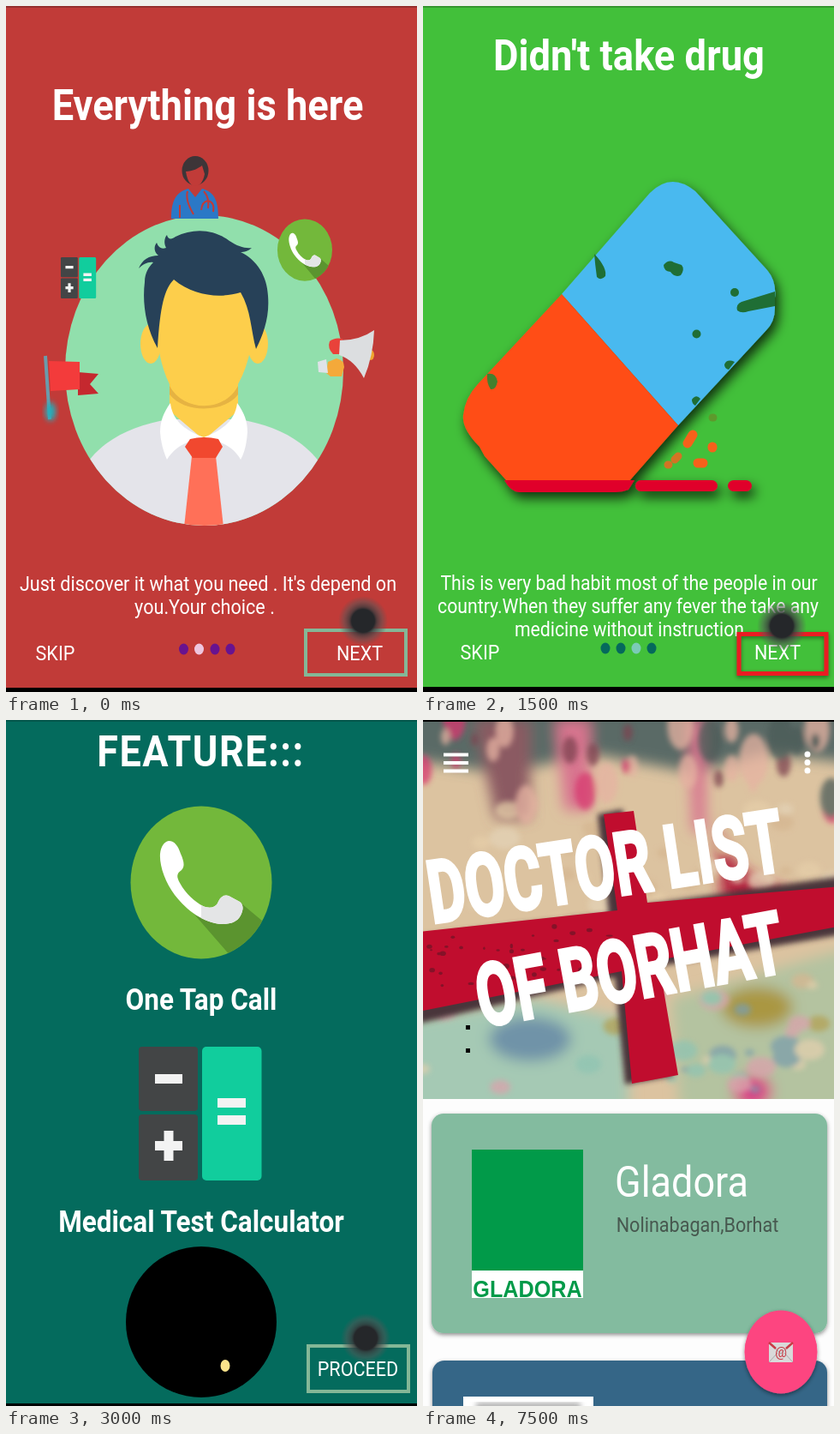
Animation of 480 by 800 pixels, one loop 9500 ms. Source, as an HTML page:

```html
<!DOCTYPE html>
<html lang="en">
<head>
<meta charset="utf-8">
<title>App walkthrough</title>
<style>
  html, body { margin: 0; width: 100%; height: 100%; overflow: hidden; background: #000; }
  svg { display: block; width: 100%; height: 100%; }
  .scene { display: none; }
  .scene.on { display: inline; }
  text { font: 24px Roboto, sans-serif; fill: #fff; text-anchor: middle;
         transform: scale(.9, 1); transform-box: fill-box; transform-origin: center; }
  .title { font-size: 50.3px; font-weight: 700; }
  .label { font-size: 35px; font-weight: 700; }
  .note text { font-size: 23.6px; }
  .banner text { font-size: 101px; font-weight: 700; text-anchor: start;
                 stroke: #fff; stroke-width: 4; stroke-linejoin: miter;
                 transform: scale(.665, 1); transform-box: view-box; transform-origin: 0 0; }
  .hand text { font: italic 700 22px "DejaVu Sans", sans-serif; letter-spacing: 1px;
               fill: #d8d8d8; stroke: #000; stroke-width: 2.4; transform: none; }
</style>
</head>
<body>
<svg viewBox="0 0 480 800" preserveAspectRatio="none">
  <defs>
    <radialGradient id="touch">
      <stop offset=".46" stop-color="#25272a"/>
      <stop offset=".56" stop-color="#3a3b3d" stop-opacity=".8"/>
      <stop offset=".78" stop-color="#555" stop-opacity=".5"/>
      <stop offset="1" stop-color="#555" stop-opacity="0"/>
    </radialGradient>
    <linearGradient id="skin" x1=".1" y1=".1" x2=".8" y2=".75">
      <stop offset=".15" stop-color="#fff"/>
      <stop offset=".5" stop-color="#a0a0a0"/>
      <stop offset=".75" stop-color="#eee"/>
      <stop offset="1" stop-color="#bbb"/>
    </linearGradient>
    <filter id="soft" x="-30%" y="-30%" width="160%" height="160%"><feGaussianBlur stdDeviation="3"/></filter>
    <filter id="haze" x="-30%" y="-30%" width="160%" height="160%"><feGaussianBlur stdDeviation="8"/></filter>
    <filter id="deep" x="-20%" y="-20%" width="140%" height="140%">
      <feDropShadow dx="4" dy="7" stdDeviation="7" flood-opacity=".75"/>
    </filter>
    <filter id="lift" x="-20%" y="-20%" width="140%" height="140%">
      <feDropShadow dx="0" dy="2" stdDeviation="2.5" flood-opacity=".45"/>
    </filter>
    <clipPath id="disc"><ellipse cx="231.500" cy="425" rx="162.500" ry="181"/></clipPath>
    <clipPath id="photo"><rect y="2" width="480" height="440"/></clipPath>
    <clipPath id="dial"><ellipse cx="228" cy="189.500" rx="82.500" ry="89"/></clipPath>
    <clipPath id="rightHalf"><rect x="228" y="190" width="60" height="60"/></clipPath>

    <path id="receiver" d="M190 141C197 141 201 147 204 156C208 165 209 171 205 175C199 179 199 183 203 190C210 203 221 212 230 217C237 220 244 219 247 214C250 206 255 203 260 205L273 212C278 216 277 222 274 228C270 236 261 238 252 238C231 237 211 222 197 204C186 189 179 170 180 156C181 147 185 142 190 141Z"/>
    <g id="phone">
      <ellipse cx="228" cy="189.500" rx="82.500" ry="89" fill="#73b83b"/>
      <path d="M209 214L275 290L330 260L275 214L240 232Z" fill="#5b942f" clip-path="url(#dial)"/>
      <use href="#receiver" fill="#fff"/>
      <use href="#receiver" fill="#e4e5e6" clip-path="url(#rightHalf)"/>
    </g>
    <g id="calc" fill="#434546">
      <rect x="155" y="381" width="69" height="75" rx="4"/>
      <rect x="155" y="460" width="69" height="77" rx="4"/>
      <rect x="229" y="381" width="69.500" height="156" rx="5" fill="#11cd9d"/>
      <path d="M174 413h32v11h-32zM174 491h32v11h-32zM184.500 479h11v35h-11zM247 441h33v11h-33zM247 461h33v11h-33z" fill="#f3f3f3"/>
    </g>
    <circle id="dot" r="29" fill="url(#touch)"/>
    <path id="handShape" d="M334 686C330 664 319 640 319 611C319 586 331 574 350 573L381 571C397 572 405 580 411 592C419 607 441 624 455 643C461 655 447 661 438 652L426 643C428 669 435 695 439 719C441 738 421 745 409 735C402 728 402 715 398 704C395 713 378 709 375 698C371 706 355 702 353 691C350 699 337 697 334 686Z"/>
  </defs>

  <!-- welcome -->
  <g class="scene" color="#c13b38">
    <rect width="480" height="800" fill="currentColor"/>
    <rect width="480" height="2" fill="#96302e"/>
    <rect y="795" width="480" height="5"/>
    <text class="title" x="235.500" y="133">Everything is here</text>

    <g clip-path="url(#disc)">
      <rect x="60" y="240" width="350" height="370" fill="#91dfac"/>
      <path d="M90 540C110 507 145 490 190 482H272C318 490 350 507 372 540V610H90Z" fill="#e4e4ea"/>
      <path d="M191 440H271V472L231 506L191 472Z" fill="#fdce4b"/>
      <path d="M191 443C208 474 255 474 271 443V453C255 475 208 475 191 453Z" fill="#e6b342"/>
      <path d="M192 463C184 474 180 484 180 497C181 510 184 520 188 529C196 516 208 508 231 503C206 494 194 481 192 463ZM270 463C278 474 282 484 282 497C281 510 279 520 274 529C267 516 254 508 231 503C256 494 268 481 270 463Z" fill="#fff"/>
      <path d="M217 525H245L254 608H208Z" fill="#ff7058"/>
      <path d="M215 505Q231 501 248 505L253 514L245 527H218L209 514Z" fill="#f1482f"/>
    </g>
    <g fill="#fdce4b">
      <ellipse cx="169" cy="394" rx="12" ry="23"/>
      <ellipse cx="294" cy="394" rx="12" ry="23"/>
      <path d="M178 335L198 310H270L290 340C291 379 286 414 271 441C253 469 209 469 191 441C177 413 173 375 178 335Z"/>
    </g>
    <path d="M177 399C163 374 159 346 162 322C162 311 167 304 172 299C166 298 160 301 155 306C159 296 167 291 178 291C172 286 173 280 176 276C178 282 182 284 187 282C184 277 185 270 188 267C189 272 193 273 198 269C219 259 242 260 261 274C270 280 279 283 287 282C283 286 278 287 274 287C293 296 305 315 306 338C308 362 301 382 292 400C286 378 286 354 274 334C251 341 220 339 196 319C185 330 180 350 177 399Z" fill="#274158"/>

    <ellipse cx="221" cy="192" rx="15.500" ry="17" fill="#3d3538"/>
    <path d="M210 193C218 193 225 189 229 186L232 196C230 207 225 210 221 210C216 210 212 205 210 193Z" fill="currentColor"/>
    <path d="M193 248C193 226 199 217 213 213L221 223L229 213C243 217 248 226 248 248Z" fill="#2b78c6"/>
    <path d="M212 216Q209 226 219 243M231 216Q238 224 236 236M228 238Q229 228 236 227Q244 229 242 240M203 232V247" fill="none" stroke="currentColor" stroke-width="2"/>

    <use href="#phone" transform="translate(260.500 207.600) scale(.388 .406)"/>
    <use href="#calc" transform="translate(19.500 175.700) scale(.287 .308)"/>

    <path d="M84 427L108 429L98 441L108 452L84 454Z" fill="#c5282f"/>
    <path d="M50 414L86 415V447L52 449Z" fill="#f33b3b"/>
    <path d="M46 408L51 482" stroke="#6a9bab" stroke-width="4"/>
    <ellipse cx="52" cy="473" rx="6" ry="11" fill="#20aebb" filter="url(#soft)"/>

    <path d="M378 391Q384 386 393 388V406H382Q375 399 378 391Z" fill="#e9423a"/>
    <ellipse cx="426" cy="407" rx="4" ry="6" fill="#f0a52f"/>
    <path d="M390 390Q413 390 430 378Q429 408 418 434Q407 413 389 407Z" fill="#dcdee0"/>
    <path d="M376 415L386 411Q395 413 395 421L392 432H379L374 428Z" fill="#f4a93a"/>
    <path d="M364 415L374 412L376 428L365 427Z" fill="#dfe3e8"/>

    <text x="236" y="682">Just discover it what you need . It's depend on</text>
    <text x="232" y="709">you.Your choice .</text>
    <g fill="#68138f">
      <ellipse cx="207.500" cy="750" rx="5.500" ry="6.500"/>
      <ellipse cx="225.500" cy="750" rx="5.500" ry="6.500" fill="#eec6df"/>
      <ellipse cx="244" cy="750" rx="5.500" ry="6.500"/>
      <ellipse cx="262" cy="750" rx="5.500" ry="6.500"/>
    </g>
    <text x="57.500" y="763">SKIP</text>
    <text x="413" y="763">NEXT</text>
    <rect x="350" y="728" width="117" height="52" fill="none" stroke="#84b797" stroke-width="4"/>
    <use class="dot" href="#dot" x="417" y="717"/>
  </g>

  <!-- warning -->
  <g class="scene" color="#42c03a">
    <rect width="480" height="800" fill="currentColor"/>
    <rect width="480" height="2" fill="#36962f"/>
    <rect y="794" width="480" height="6"/>
    <text class="title" x="240.500" y="75">Didn't take drug</text>

    <g filter="url(#deep)">
      <path d="M162 336L265 218Q290 193 318 216L402 308Q413 321 411 340V352Q411 368 401 378L298 489Z" fill="#49b9ef"/>
      <path d="M162 336L298 489L240 555H99L72 525L66 514Q45 493 47 477Q49 457 64 441Z" fill="#ff4e14"/>
      <path d="M95 553H247L240 564Q233 567 225 567H112Q102 566 95 553Z" fill="#e0062b"/>
      <rect x="248" y="553" width="96" height="13" rx="6.500" fill="#e0062b"/>
      <rect x="356" y="553" width="28" height="13" rx="6.500" fill="#e0062b"/>
    </g>
    <g fill="#1f6e35">
      <path d="M200 289Q215 305 213 315Q208 321 203 316Q201 302 200 289Z"/>
      <path d="M281 302Q287 295 293 299L302 302Q306 307 301 314Q294 317 289 310Q281 309 281 302Z"/>
      <path d="M411 333L372 345Q365 348 367 355Q372 359 380 356L411 350Z"/>
      <circle cx="364" cy="334" r="5"/>
      <circle cx="319.500" cy="382.500" r="5"/>
      <path d="M352 418Q355 411 364 415L357 424Q352 423 352 418Z"/>
      <path d="M314 459Q319 452 324 458L318 466Q314 464 314 459Z"/>
      <path d="M75 429Q85 427 87 438Q85 448 79 447Q74 440 75 429Z" fill="#43802e"/>
    </g>
    <g stroke="#f6611b" stroke-width="11" stroke-linecap="round">
      <path d="M315 500L309 510M338 514v1M321 533H327"/>
      <path d="M286 535h1M294 529L298 525" stroke="#d27424" stroke-width="9"/>
      <path d="M338 480h1" stroke="#5d9a2c" stroke-width="9"/>
    </g>

    <g class="note">
      <text x="240.500" y="681">This is very bad habit most of the people in our</text>
      <text x="239.500" y="708">country.When they suffer any fever the take any</text>
      <text x="241" y="735">medicine without instruction</text>
    </g>
    <g fill="#05695c">
      <ellipse cx="213" cy="749" rx="5.500" ry="6.500"/>
      <ellipse cx="231" cy="749" rx="5.500" ry="6.500"/>
      <ellipse cx="249" cy="749" rx="5.500" ry="6.500" fill="#7bcbb6"/>
      <ellipse cx="267" cy="749" rx="5.500" ry="6.500"/>
    </g>
    <text x="66.500" y="762">SKIP</text>
    <text x="414" y="762">NEXT</text>
    <rect x="369" y="732.500" width="102" height="46" fill="none" stroke="#ea1c23" stroke-width="5" filter="url(#lift)"/>
    <use class="dot" href="#dot" x="419" y="723"/>
  </g>

  <!-- features -->
  <g class="scene" color="#046b5d">
    <rect width="480" height="800" fill="currentColor"/>
    <rect width="480" height="2" fill="#04564b"/>
    <rect y="797" width="480" height="3"/>
    <text class="title" x="227.500" y="54" style="font-size:50px;letter-spacing:1.7px">FEATURE:::</text>
    <use href="#phone"/>
    <text class="label" x="228" y="338">One Tap Call</text>
    <use href="#calc"/>
    <text class="label" x="228" y="597">Medical Test Calculator</text>
    <circle cx="228" cy="702" r="88"/>
    <ellipse cx="256" cy="753" rx="5.500" ry="7" fill="#fbe38b"/>
    <text x="411" y="765">PROCEED</text>
    <rect x="353" y="730" width="117" height="53" fill="none" stroke="#84b797" stroke-width="4"/>
    <use class="dot" href="#dot" x="420" y="721"/>
  </g>

  <!-- doctor list -->
  <g class="scene">
    <rect width="480" height="800" fill="#fdfdfd"/>
    <rect width="480" height="2"/>
    <g clip-path="url(#photo)">
      <rect width="480" height="442" fill="#dcc3a0"/>
      <g filter="url(#haze)">
        <path d="M-20-20H500V50L400 38L320 62L200 40L90 62L-20 45Z" fill="#5a6a66"/>
        <path d="M60 0H125V115H85Z" fill="#8b5a62"/>
        <path d="M155 0H195V105H165ZM310 0H330V130H315Z" fill="#d8748f"/>
        <path d="M-20 350L130 325L240 350V460H-20Z" fill="#a5c9b4"/>
        <path d="M290 325L500 265V460H300Z" fill="#b4c3a0"/>
        <ellipse cx="125" cy="372" rx="48" ry="26" fill="#6f93a8"/>
        <ellipse cx="390" cy="335" rx="42" ry="24" fill="#aa9743"/>
        <ellipse cx="385" cy="433" rx="22" ry="20" fill="#d93f86"/>
        <path d="M340 110Q350 180 430 200L470 215L450 235L350 215Z" fill="#b3213c"/>
      </g>
      <g id="paint" filter="url(#soft)" opacity=".75"></g>
      <path d="M204 110L233 104L256 216L490 182V250L270 288L292 415L236 425L224 300L-5 354V252L217 226Z" fill="#48343a" filter="url(#soft)"/>
      <path d="M211 110L246 106L262 213L490 194V240L275 280L298 414L244 424L232 293L-5 340V247L227 222Z" fill="#c00d2e"/>
      <g id="flecks" fill="#6d1526" opacity=".7"></g>
    </g>
    <g class="banner">
      <g transform="translate(11 237) rotate(-8.500)"><text>DOCTOR LIST</text></g>
      <g transform="translate(69 358) rotate(-10.300)"><text>OF BORHAT</text></g>
    </g>
    <path d="M50 356h5v5h-5zM50 383h5v5h-5z"/>
    <path d="M24 40.500H53M24 50H53M24 59.500H53" stroke="#fff" stroke-width="4"/>
    <path d="M449 40v0M449 49.500v0M449 59v0" stroke="#fff" stroke-width="7" stroke-linecap="round"/>

    <rect x="10" y="459" width="462" height="256" rx="14" fill="#83bb9f" filter="url(#lift)"/>
    <rect x="57" y="501" width="130" height="173" fill="#fff"/>
    <rect x="57" y="501" width="130" height="141" fill="#019a49"/>
    <text x="122" y="673" style="font:700 28px 'Liberation Sans',sans-serif;fill:#019a49">GLADORA</text>
    <text x="302" y="556" style="font-size:50px">Gladora</text>
    <text x="320.500" y="597" style="fill:#47584f">Nolinabagan,Borhat</text>

    <rect x="11" y="747" width="461" height="80" rx="14" fill="#356687" filter="url(#lift)"/>
    <rect x="47" y="789" width="152" height="11" fill="#fff"/>
    <rect x="62" y="797" width="122" height="6" fill="#999" filter="url(#soft)"/>
    <ellipse cx="418" cy="737" rx="42.500" ry="48.500" fill="#fd4480" filter="url(#lift)"/>
    <rect x="404" y="726" width="28" height="23" fill="#d9d9d9"/>
    <path d="M404 726L418 739L432 726M404 749L414 738M432 749L422 738" fill="none" stroke="#a9a9a9"/>
    <path d="M404 726L412 733M432 726L424 733" stroke="#c93a45" stroke-width="2.500"/>
    <text x="418" y="743" style="font-size:17px;fill:#c93a45">@</text>
  </g>

  <g class="hand" id="hand" stroke-linejoin="round" stroke-linecap="round">
    <g filter="url(#lift)"><use href="#handShape" fill="#fff" stroke="#f4f4f4" stroke-width="15"/></g>
    <use href="#handShape" fill="url(#skin)" stroke="#000" stroke-width="6.500"/>
    <path d="M353 691L350 669M375 698L371 671M398 704L392 676M426 643L417 637" fill="none" stroke="#000" stroke-width="5"/>
    <path d="M329 612L336 593L358 583L390 579L403 592L408 612L425 626L412 632L404 642L392 640L383 651L366 647L352 659L343 648L338 630Z" fill="currentColor"/>
    <g transform="translate(368 612) rotate(-24)"><text>CLICK</text></g>
    <g transform="translate(374 649) rotate(-22)"><text>HERE</text></g>
  </g>
</svg>
<script>
  const LOOP = 9500, STEP = 1500, PRESS = 1000;
  const scenes = [...document.querySelectorAll('.scene')];
  const dots = document.querySelectorAll('.dot');
  const hand = document.getElementById('hand');

  let seed = 7;
  const rand = () => (seed = seed * 16807 % 2147483647) / 2147483647;

  function blob(parent, x, y, rx, ry, fill) {
    const el = document.createElementNS('http://www.w3.org/2000/svg', 'ellipse');
    Object.entries({ cx: x, cy: y, rx, ry }).forEach(([k, v]) => el.setAttribute(k, v));
    if (fill) el.setAttribute('fill', fill);
    document.getElementById(parent).append(el);
  }

  // Paint drips along the top, calm plaster in the middle, patches below.
  const drips = ['#d8386f', '#4c5b58', '#e6b3a2', '#7d4250'];
  const plaster = ['#e5cda8', '#d5b691', '#e3d2b6'];
  const patches = ['#8fc4b2', '#e2cfae', '#b3a155', '#d9a3ac', '#7c9eab'];
  for (let i = 0; i < 110; i++) {
    const x = rand() * 480, y = rand() * 442;
    const tones = y < 100 ? drips : y < 310 ? plaster : patches;
    const w = 4 + rand() * 14;
    blob('paint', x, y, w, y < 100 ? w * 1.8 : w * .7, tones[Math.floor(rand() * tones.length)]);
  }
  for (let i = 0; i < 45; i++) {
    const x = rand() * 225;
    blob('flecks', x, 253 - x * .1 + rand() * 70, 1 + rand() * 3, 1 + rand() * 2);
  }

  function draw() {
    const t = performance.now() % LOOP;
    const index = Math.min(3, Math.floor(t / STEP));
    const pressed = index < 3 && t % STEP >= PRESS;
    scenes.forEach((s, i) => s.classList.toggle('on', i === index));
    dots.forEach(d => d.style.display = pressed ? 'none' : '');
    hand.style.display = pressed ? '' : 'none';
    hand.setAttribute('color', scenes[index].getAttribute('color') || '#fff');
    requestAnimationFrame(draw);
  }
  draw();
</script>
</body>
</html>
```
